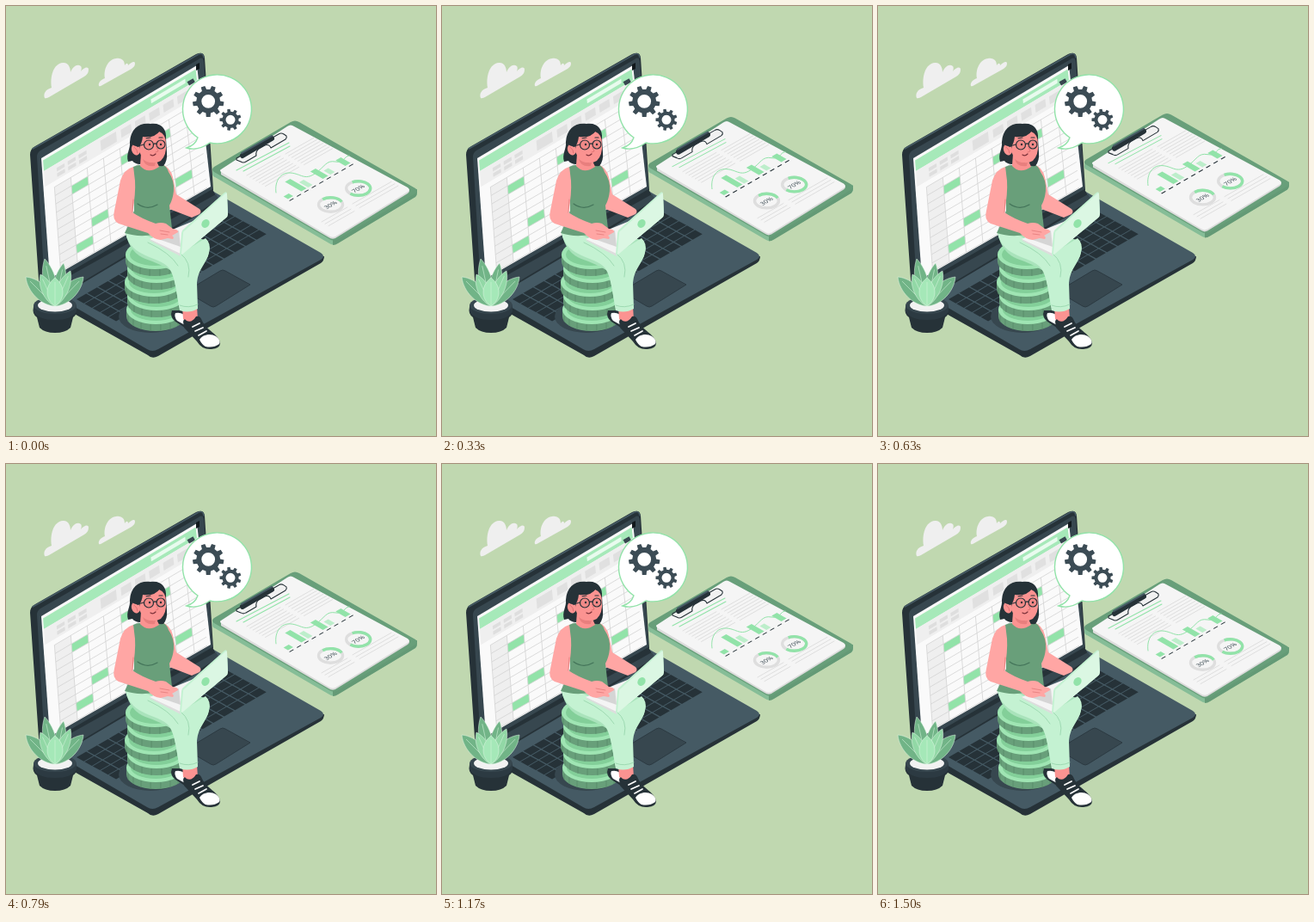
Animation, 500 px wide and 500 px high, one loop 1.54 s. Source, as an HTML page:

```html
<!DOCTYPE html>
<html lang="en">
<head>
<meta charset="utf-8">
<title>Online accounting</title>
<style>
  html, body { margin: 0; width: 100%; height: 100%; overflow: hidden; background: #c0d8b0; }
  svg { display: block; width: 100vw; height: 100vh; }
  text { font: 500 7.6px "Open Sans", Arial, sans-serif; fill: #37474f; text-anchor: middle; }
  .dark { fill: #263238; }
  .slate { fill: #37474f; }
  .skin { fill: #ffa6a4; }
  .face { fill: #fb9391; }
  .mint { fill: #c4f2d2; }
  .line { fill: none; stroke-linecap: round; stroke-linejoin: round; }
</style>
</head>
<body>
<svg viewBox="0 0 500 500">
  <rect width="500" height="500" fill="#c0d8b0"/>

  <g id="clouds" fill="#efefef">
    <path d="M45 107C43 102 46 97 53 95C51 82 55 67 66 66C72 65 75 71 75 77C78 70 83 67 87 70C88 71 88 73 87 76C91 71 96 70 96 74C96 78 94 80 91 82L50 106Q46 108 45 107Z"/>
    <path d="M108 93C107 89 110 86 115 84C113 73 119 62 128 61C135 60 138 64 138 69C140 66 142 66 142 69C145 66 150 63 150 67C150 70 148 71 146 73L112 92Q109 94 108 93Z"/>
  </g>

  <g id="board">
    <path d="M240 190V195Q240 198 243 199L376 276Q381 279 385 276L476 222Q478 220 478 217V213Z" fill="#85bd97"/>
    <path d="M380 270V278Q383 278 386 276L476 222Q478 220 478 217V213Z" fill="#649a76"/>
    <path d="M242 187L331 135Q336 132 341 135L476 212Q480 215 476 218L386 271Q381 274 376 271L242 193Q238 190 242 187Z" fill="#689f7a"/>
    <path d="M250 193L327 141Q331 138 335 141L467 213Q471 215 467 218L383 270Q379 272 375 269L250 196Z" fill="#dcdcdc"/>
    <path d="M250 190L327 140Q331 137 335 140L467 211Q471 214 467 216L383 268Q379 270 375 267L250 193Q248 191 250 190Z" fill="#f5f5f5"/>
    <g id="notes" class="line" stroke="#d9d9d9" stroke-width=".8"></g>
    <path class="line" d="M268 191L329 159M276 192L330 163" stroke="#92e3a9" stroke-width="1.1"/>
    <path class="line" d="M314 217C312 204 319 193 331 194S347 203 359 195S372 179 383 181S392 175 399 174" stroke="#92e3a9" stroke-width="1"/>
    <g id="chart" transform="matrix(.866 -.5 .866 .5 327 225)"></g>
    <g id="rings"></g>
    <g class="line" stroke="#263238">
      <path d="M268 177L317 149Q320 147 323 149L326 151Q327 153 325 155L308 165Q306 160 301 162L294 166Q290 169 291 174L279 181Q276 183 273 181L268 179Z" stroke-width="1.1" fill="#eee" fill-opacity=".5"/>
      <path d="M275 174L309 154" stroke-width="6"/>
      <path d="M274 171L309 151" stroke="#455a64" stroke-width="2"/>
    </g>
  </g>

  <g id="base">
    <path class="dark" d="M44 329V338L165 406Q170 411 177 407L366 299Q370 296 370 291Z"/>
    <path d="M44 329L240 215L366 287Q372 291 366 295L177 399Q170 403 164 399Z" fill="#455a64"/>
    <path class="dark" d="M44 316L240 213L248 228L78 329L60 336Z"/>
    <path class="slate" d="M54 325L244 219L248 225L80 326Z"/>
    <path d="M209 332L249 308Q252 306 255 308L284 324L244 349Q241 351 238 349Z" class="slate" stroke="#2c3a42"/>
  </g>
  <g id="keys" class="dark"></g>

  <g id="lid">
    <path class="dark" d="M28 173Q28 166 34 163L221 56Q230 52 231 60L241 214L44 328Q39 326 38 318Z"/>
    <path d="M36 175Q36 171 40 168L224 62Q229 58 230 65L240 213L45 326Z" class="slate"/>
    <path class="line" d="M31 166L224 56Q229 54 230 60" stroke="#455a64" stroke-width="1.5"/>
    <g id="sheet"></g>
    <rect x="211" y="86" width="8" height="5" transform="rotate(-30 215 88)" class="slate"/>
    <path d="M221 68L225 66V73L221 75Z" fill="#11181c"/>
  </g>

  <ellipse cx="168" cy="361" rx="37" ry="19" class="slate"/>
  <g id="coins"></g>

  <g id="legs">
    <path class="dark" d="M193 354Q190 362 197 367L208 374L216 369L205 354Z"/>
    <path d="M197 357Q195 361 199 366L208 371L211 364Q206 355 197 357Z" fill="#fff"/>
    <path d="M139 264Q168 258 195 264L232 272Q239 278 235 290C231 301 222 305 222 322V338L201 348L194 309Q180 300 162 294Q144 287 139 264Z" fill="#a9e3bb"/>
    <path class="face" d="M205 350H222L223 364Q214 372 206 364Z"/>
    <path class="mint" d="M139 264Q151 262 166 268L203 288L232 270Q239 276 236 287C234 298 223 306 222 322L223 352Q213 358 202 354C199 338 197 314 189 304C178 291 145 293 139 264Z"/>
    <path class="line" d="M203 288Q216 298 212 315M202 348Q212 352 223 347M165 275Q191 287 200 302" stroke="#9edab2" stroke-width="1"/>
    <path class="dark" d="M206 367Q207 362 210 366Q216 369 221 361Q226 360 228 366C233 377 248 382 249 392Q249 398 239 399Q228 400 222 390L207 374Z"/>
    <path d="M225 388C228 382 238 380 244 384Q250 388 248 393Q241 398 232 396Q228 394 225 388Z" fill="#fff"/>
    <path class="line" d="M217 373L225 369M220 378L229 374M224 383L233 378" stroke="#fff" stroke-width="1.7"/>
  </g>

  <g id="body">
    <path class="skin" d="M181 184Q191 187 194 199L198 219L225 236Q228 239 225 242L216 246L190 236L184 214Z"/>
    <path d="M148 187Q156 183 164 186L181 184Q187 186 189 193Q196 203 195 215Q194 225 190 232L191 241L193 259Q188 266 172 266Q153 269 138 264Q145 249 149 238Z" fill="#699f7a"/>
    <path class="line" d="M153 230Q164 238 176 231" stroke="#44755a" stroke-width="1.2"/>
    <path class="dark" d="M142 181C139 172 145 166 144 158C145 142 156 135 168 137C181 135 187 144 186 154L187 170Q188 180 183 186Q174 187 170 181L155 184Q149 183 147 180Z"/>
    <path class="face" d="M157 171L156 186Q165 196 178 187L174 178Z"/>
    <path d="M159 178Q166 184 174 181L173 186Q162 188 159 178Z" fill="#e87f7e"/>
    <path class="face" d="M157 151Q170 153 178 146Q186 149 186 160Q187 173 180 180Q171 185 162 179Q157 175 155 169Z"/>
    <ellipse cx="151" cy="167" rx="5" ry="6.5" class="face" transform="rotate(-18 151 167)"/>
    <path class="dark" d="M154 164Q158 161 159 152Q173 154 179 145Q169 138 155 145Q145 153 148 162Z"/>
    <path class="line" d="M149 164Q153 167 153 171" stroke="#de7273" stroke-width="1"/>
    <g class="line" stroke="#263238" stroke-width="1.2">
      <circle cx="166" cy="161.500" r="5.500" fill="#f08987"/>
      <circle cx="180" cy="161" r="5" fill="#f08987"/>
      <path d="M171.500 161Q173 159 175 160.500M160.500 161L153 163M163 154L168 153M178 153L182 153"/>
    </g>
    <circle cx="167" cy="161" r="1.2" class="dark"/>
    <circle cx="180" cy="161" r="1.2" class="dark"/>
    <path class="line" d="M174 162L177 169L174 170" stroke="#de7273" stroke-width=".9"/>
    <path class="line" d="M168 173Q171 175 174 172" stroke="#7d333b" stroke-width="1.2"/>
    <path d="M167 271L196 259L218 250L203 290Z" fill="#f4f4f4"/>
    <path d="M177 271L201 261L203 280Z" fill="#d5d5d5"/>
    <path class="skin" d="M148 187Q137 190 133 203L126 238Q123 249 131 253L165 264Q171 271 180 272L188 270L194 271Q196 269 193 267L200 263Q201 260 194 259L186 253Q180 251 174 253Q157 247 147 240Q151 218 150 203Z"/>
    <path class="line" d="M147 240L148 225M180 265L188 266M179 261L190 263" stroke="#e67f7e" stroke-width=".9"/>
    <path d="M167 271L203 288V291L168 273Z" fill="#ddd"/>
    <path d="M204 264Q204 261 207 259L254 217Q257 215 257 219L258 242Q258 245 255 247L206 288Q203 291 202 289Z" fill="#c4f2d2"/>
    <path d="M206 264Q206 262 208 261L254 219Q257 216 257 219L258 242Q258 245 255 247L206 288Q204 290 204 287Z" fill="#dbf7e3"/>
    <ellipse cx="232" cy="253" rx="4.300" ry="5.300" transform="rotate(35 232 253)" fill="#92e3a9"/>
  </g>

  <g id="bubble">
    <path d="M223 153Q220 162 210 165Q223 169 237 159A40 40 0 1 0 223 153Z" fill="#fff" stroke="#92e3a9" stroke-width="1.4"/>
    <g id="gears" fill="#3c4c55" fill-rule="evenodd"></g>
  </g>

  <g id="plant">
    <path class="dark" d="M32 350Q30 358 36 362L39 374Q45 380 57 380T75 374L78 362Q84 358 81 350Z"/>
    <path d="M32 348H82V355Q77 365 57 365T32 355Z" fill="#2c3a42"/>
    <ellipse cx="57" cy="348" rx="25" ry="10" class="slate"/>
    <ellipse cx="57" cy="348" rx="20" ry="7.500" fill="#f2f2f2"/>
    <g id="leaves"></g>
  </g>
</svg>
<script>
const el = id => document.getElementById(id);
const fill = (id, parts) => { el(id).innerHTML = parts.join(''); };
const range = (n, make) => Array.from({ length: n }, (_, i) => make(i));
const lerp = (a, b, t) => a + (b - a) * t;
const pts = list => list.map(p => p.map(n => n.toFixed(2)).join()).join(' ');

// Laptop display: u runs along the rows, v runs down.
function onScreen(u, v) {
  return [
    lerp(lerp(41, 222, u), lerp(51, 238, u), v),
    lerp(lerp(177, 69, u), lerp(317, 210, u), v)
  ];
}
function cell(u, v, w, h, color) {
  const quad = [onScreen(u, v), onScreen(u + w, v), onScreen(u + w, v + h), onScreen(u, v + h)];
  return `<polygon points="${pts(quad)}" fill="${color}"/>`;
}
const rule = (a, b) => `<polyline points="${pts([a, b])}" stroke="#d4d4d4" stroke-width=".8"/>`;
const colW = .104, rowH = .07, left = .068, top0 = .292;
const marked = [[1, 1], [2, 6], [1, 8], [4, 1], [7, 7], [6, 1]];

fill('sheet', [
  cell(0, 0, 1, 1, '#fafafa'),
  cell(.01, .025, .98, .09, '#a6e9b9'),
  cell(.7, .05, .22, .035, '#e8fbee'),
  cell(.01, .115, .98, .13, '#efefef'),
  ...range(3, i => cell(.09 + i * .07, .15, .05, .03, '#dedede')),
  ...range(3, i => cell(.09 + i * .07, .195, .05, .03, '#dedede')),
  cell(.37, .14, .1, .085, '#e0e0e0'),
  ...range(5, i => cell(.5 + i * .09, .15, .065, .065, '#e0e0e0')),
  cell(left, top0, colW, .7, '#efefef'),
  ...marked.map(([c, r]) => cell(left + c * colW, top0 + r * rowH, colW, rowH, '#92e3a9')),
  ...range(11, i => rule(onScreen(left, top0 + i * rowH), onScreen(.98, top0 + i * rowH))),
  ...range(9, i => rule(onScreen(left + i * colW, top0), onScreen(left + i * colW, .99)))
]);

const onKeys = (a, b) => [82 + 176 * a + 47 * b, 341 - 102 * a + 26 * b];
fill('keys', range(70, i => {
  const a = (i % 14) / 14, b = Math.floor(i / 14) / 5, w = .064, h = .18;
  return `<polygon points="${pts([onKeys(a, b), onKeys(a + w, b), onKeys(a + w, b + h), onKeys(a, b + h)])}"/>`;
}));

fill('coins', range(5, i => {
  const x = [174, 175, 172, 175, 173][i], y = 353 - i * 16, rx = 34, ry = 17;
  const ticks = range(8, k => {
    const a = Math.PI * (k + 1) / 9;
    return `M${x + rx * Math.cos(a)} ${y + ry * Math.sin(a)}v8`;
  }).join('');
  return `<path d="M${x - rx} ${y}v8a${rx} ${ry} 0 0 0 ${rx * 2} 0v-8Z" fill="#689f7a"/>
    <path d="${ticks}" stroke="#5a8e6c" stroke-width="1"/>
    <ellipse cx="${x}" cy="${y}" rx="${rx}" ry="${ry}" fill="#9fe5b3"/>
    <ellipse cx="${x}" cy="${y}" rx="29" ry="13" fill="#83cf99"/>`;
}));

function gear(x, y, r, hole, teeth, turn) {
  const rim = [];
  for (let i = 0; i < teeth; i++) {
    [[-.29, .76], [-.19, 1], [.19, 1], [.29, .76]].forEach(([o, k]) => {
      const a = (i + o) * 2 * Math.PI / teeth + turn;
      rim.push([x + r * k * Math.cos(a), y + r * k * Math.sin(a)]);
    });
  }
  return `<path d="M${pts(rim)}ZM${x - hole} ${y}a${hole} ${hole} 0 1 0 ${hole * 2} 0a${hole} ${hole} 0 1 0 ${-hole * 2} 0Z"/>`;
}
fill('gears', [gear(235.2, 110.8, 18.3, 7.9, 9, Math.PI / 2), gear(261, 132.3, 12.6, 5.5, 9, .35)]);

// Leaf from a shared root to its tip.
function leaf(tx, ty, w, color) {
  const x = 57, y = 349, dx = tx - x, dy = ty - y, len = Math.hypot(dx, dy);
  const nx = -dy / len * w, ny = dx / len * w;
  const side = s => `${x + dx * .25 + nx * s} ${y + dy * .25 + ny * s} ${x + dx * .72 + nx * s} ${y + dy * .72 + ny * s}`;
  const back = `${x + dx * .72 - nx} ${y + dy * .72 - ny} ${x + dx * .25 - nx} ${y + dy * .25 - ny}`;
  return `<path d="M${x} ${y}C${side(1)} ${tx} ${ty}C${back} ${x} ${y}Z" fill="${color}" stroke="#e0f6e4" stroke-width=".5"/>
    <path d="M${x} ${y}L${lerp(x, tx, .85)} ${lerp(y, ty, .85)}" stroke="#d0f1d8" stroke-width=".6"/>`;
}
fill('leaves', [
  leaf(45, 294, 10, '#71b487'), leaf(67, 299, 9, '#71b487'),
  leaf(23, 315, 11, '#71b487'), leaf(90, 315, 11, '#71b487'),
  leaf(40, 312, 9, '#92d8a6'), leaf(75, 308, 9, '#92d8a6'),
  leaf(57, 316, 12, '#a5e8b8')
]);

const bars = [[1, 7, 6], [19, 7, 22], [28, 6, 12], [48, 7, 17], [58, 6, 9], [78, 7, 13]];
fill('chart', [
  ...bars.map(([x, w, h], i) =>
    `<rect x="${x}" y="${-h}" width="${w}" height="${h}" fill="${i === 2 || i === 4 ? '#bdeecb' : '#92e3a9'}"/>`),
  '<path d="M0 3H90" stroke="#263238" stroke-width="1.1" stroke-dasharray="5.500 4.500"/>'
]);

// Lines of small print: start, run, count and step.
const print = (x, y, run, n, step) => range(n, i =>
  `<path d="M${x + i * step} ${y + i * step * .58}l${run} ${-run * .57}"/>`);
fill('notes', [
  ...print(280, 197, 39, 7, 3.6),
  ...print(325, 172, 33, 7, 3.6),
  ...print(367, 251, 30, 3, 4),
  ...print(403, 230, 45, 3, 4)
]);

function ring(x, y, share, start) {
  const rx = 14, ry = 8.3, end = start + share * 2 * Math.PI;
  const at = a => `${x + rx * Math.cos(a)} ${y + ry * Math.sin(a)}`;
  return `<ellipse cx="${x}" cy="${y}" rx="${rx}" ry="${ry}" fill="none" stroke="#dedede" stroke-width="3.4"/>
    <path d="M${at(start)}A${rx} ${ry} 0 ${share > .5 ? 1 : 0} 1 ${at(end)}" fill="none" stroke="#92e3a9" stroke-width="3.4"/>
    <text transform="matrix(.866 -.5 .7 .55 ${x + 1.8} ${y + 1.8})">${share * 100}%</text>`;
}
fill('rings', [ring(377.5, 231, .3, -2.3), ring(409.7, 212, .7, -2.1)]);

// The clipboard rises and falls at a constant speed.
const loop = 1540, period = 1500, lead = 50, lift = 10, rest = .7;
function draw(now) {
  const phase = (now % loop + lead) % period / period;
  const y = rest - lift * (1 - Math.abs(2 * phase - 1));
  el('board').setAttribute('transform', `translate(0 ${y.toFixed(3)})`);
}
const began = performance.now();
function tick() {
  draw(performance.now() - began);
  requestAnimationFrame(tick);
}
draw(0);
requestAnimationFrame(tick);
</script>
</body>
</html>
```
